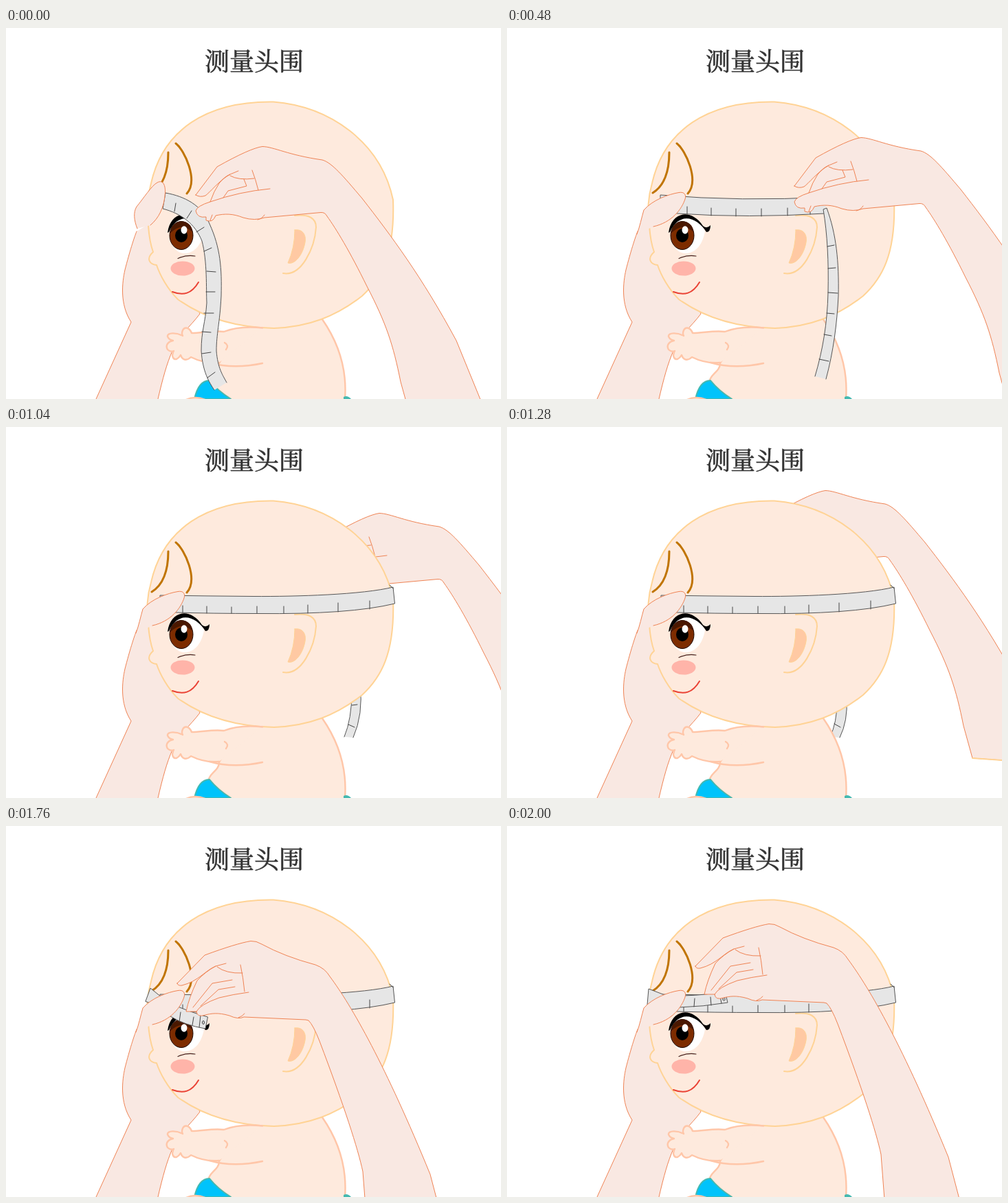
An HTML page for the animation above (4000 ms loop, 720 by 540 pixels).

```html
<!DOCTYPE html>
<html lang="zh">
<head>
<meta charset="utf-8">
<style>
html, body { margin: 0; width: 100%; height: 100%; overflow: hidden; background: #fff; }
svg { display: block; width: 720px; height: 540px; }
path { stroke-linejoin: round; stroke-linecap: round; }
.title { font: 36px "Noto Serif CJK SC", "Noto Sans CJK SC", "Noto Sans CJK", serif; fill: #333; stroke: #333; stroke-width: .6; }
.hand { fill: #f9e8e2; stroke: #ef8354; stroke-width: 1; }
.crease, .line { fill: none; }
.crease { stroke: #ef8354; stroke-width: 1; }
.head { fill: #feeadd; stroke: #ffd395; stroke-width: 2; }
.rim { fill: none; stroke: #ffd395; stroke-width: 2; }
.body { fill: #feeadd; stroke: #ffc6a8; stroke-width: 2.4; }
.tape { fill: #e6e6e6; stroke: #555; stroke-width: 1; }
.tick { fill: none; stroke: #444; stroke-width: 1; }
.hair { fill: none; stroke: #c07400; stroke-width: 3; }
</style>
</head>
<body>
<svg viewBox="0 0 720 540">
  <defs>
    <g id="flat">
      <path class="hand" d="M276 243L307 202Q355 175 373 172.500C390 173 410 185 460 192C474 196 490 215 518 248C560 302 605 362 655 455L702 570L587 562L574 515C563 460 553 430 525 376C500 325 480 292 467 274Q464 268 458 268.500L376 276Q362 281 345 276C330 270 318 270 305 273Q301 284 291 280L291 275Q278 277 276 266Q278 259 297 253Q302 238 310 226Q318 216 326 213C310 222 296 240 290 244Q282 247 276 243Z"/>
      <path class="crease" d="M297 253Q340 238 384 234M326 213L338 208M326 215Q338 222 361 219M358 207Q363 220 367 236M316 247L323 237L350 230L346 220M297 280L300 272M366 279Q372 278 376 272"/>
      <path class="rim" d="M587 562L702 570"/>
    </g>
    <g id="bent">
      <path class="hand" d="M249 229L289 188Q335 171 356 167.500Q364 167 372 172Q405 190 450 202Q464 207 471 219C503 262 552 348 617 507L633 568H524L519 503C512 470 492 408 456 313Q447 290 440 283L436 282L346 278Q338 282 325 276C308 271 298 273 290 275Q278 279 277 270L262 270Q266 250 278 225Q290 212 305 204C290 210 280 226 256 232Q250 233 249 229Z"/>
      <path class="crease" d="M277 270Q282 260 310 250Q330 245 353 242M305 204L320 200M307 205Q320 215 344 214M341 202Q345 220 347 241M272 264L300 229L329 224M283 262L309 238L333 234M338 279Q344 277 347 273"/>
      <path class="rim" d="M524 568H633"/>
    </g>
  </defs>

  <text class="title" x="361" y="62" text-anchor="middle">测量头围</text>
  <path class="hand" d="M190 296C186 306 180 325 173 352C169 370 165 402 182 428L131 540V545H220L221 540C228 510 234 488 242 470C250 448 268 435 282 416L250 340L225 275"/>
  <g id="back"></g>

  <path class="body" d="M460 424C485 460 496 500 493 540V545H327V540Q308 528 295 513C296 504 310 500 310 488L340 437"/>
  <path d="M274 540Q280 513 296 513Q308 528 327 540Z" fill="#00c3fb" stroke="#45b9b0" stroke-width="2"/>
  <path d="M491 541V537Q497 534 503 541Z" fill="#45b9b0"/>
  <path class="body" d="M258 543Q275 533 294 543"/>
  <path class="head" d="M207 288C203 262 207 240 211 226C228 150 290 106 389 107.500C470 114 545 165 563 250C566 330 545 365 518 390C480 420 440 435 390 437C330 436 285 420 250 395C235 380 224 360 219 345C209 344 203 336 214 326C210 315 208 302 207 288Z"/>
  <path class="body" d="M373 436.500C350 434 330 437 317 442C300 440 285 444 270 444C267 436 260 434 257 440Q255 445 257 448C248 443 234 443 235 449Q237 454 243 455C234 457 232 463 235 468Q239 472 244 470C240 477 243 483 248 482Q252 480 254 476C257 485 264 484 269 479C285 487 298 488 310 487"/>
  <path class="body" style="fill:none" d="M296 487Q330 497 373 488M318 458Q325 462 320 468"/>

  <path class="hair" d="M236 181Q236 225 212 240M247 168C260 178 280 222 263 241"/>
  <path d="M240 292C250 270 275 270 288 296C284 318 272 328 260 328C248 328 241 318 239 306Z" fill="#fff"/>
  <ellipse cx="255" cy="302" rx="17" ry="20.500" fill="#7d2c00" stroke="#1a0800"/>
  <path d="M238.500 299C240 276 270 276 271.500 297Q255 282 238.500 299Z" fill="#4a1800"/>
  <ellipse cx="255" cy="302" rx="9" ry="10"/>
  <ellipse cx="259" cy="294" rx="4.500" ry="5.800" fill="#fff"/>
  <path d="M235 298C239 267 268 262 285 288Q291 293 296 287Q296 297 290 297C277 276 251 266 237 297Z"/>
  <path class="line" d="M250 335.500Q262 330 275 332" stroke="#43201c" stroke-width="1.200"/>
  <ellipse cx="257" cy="350" rx="17.500" ry="10.500" fill="#ffb4a9"/>
  <path class="line" d="M242 384C258 390 270 387 280 370" stroke="#ea4335" stroke-width="2"/>
  <path class="rim" d="M420 273Q451 270 451 290C449 320 430 362 403 357"/>
  <path d="M420 294C432 292 437 302 435 312C432 330 420 345 410 342Q420 320 420 294Z" fill="#ffc9a3" stroke="#ffd395"/>

  <g id="tape"></g>
  <path id="thumb" class="hand"/>
  <g id="front"></g>
</svg>
<script>
const el = id => document.getElementById(id);
const mix = (a, b, k) => {
  const to = b.match(/-?[\d.]+/g);
  let i = 0;
  return a.replace(/-?[\d.]+/g, n => +n + (to[i++] - n) * k);
};
const tape = (d, ticks = '') => `<path class="tape" d="${d}"/><path class="tick" d="${ticks}"/>`;
const hand = (shape, x, y) => `<use href="#${shape}" x="${x}" y="${y}"/>`;

const thumbUp = 'M191 292C186 280 185 268 190 260C200 248 212 229 220 225C229 220 232 230 231.5 240C230 262 222 277 210 287';
const thumbFlat = 'M189 300C193 290 196 275 199 265C212 250 235 242 250 239.5C258 238 261 243 259 249C254 264 240 283 213 289';

const band = tape('M247 270Q300 271.5 365 271.5Q500 273 565.5 257L563 233C520 244 420 247 360 246.500Q290 246 224 245V265Z',
  'M257 270v-10M292 271v-10M328 271v-9M365 271v-10M404 271v-10M439 271v-12M483 269v-13M529 265v-12M558 230L563 235');

// Loose end of the tape, from the fold to its final place on the forehead
const endA = ['M239 277Q260 290 290 295L293.5 278Q275 273 250 263',
  'M254 271L252 285M273 278L271 290M283 276L281 293M285.5 286a1.5 2.5 0 1 0 3 0a1.5 2.5 0 1 0 -3 0'];
const endB = ['M250 264Q285 263 321 257L317 241Q290 246 258 247',
  'M273 251L272 263M296 249L297 261M309 243L312 258M314 252a1.5 2.5 0 1 0 3 0a1.5 2.5 0 1 0 -3 0'];
const foldA = 'M203 255L210 236L226 249L222 262Z', foldB = 'M204 260L206 237L232 247L225 262Z';

const wrap = k => ({
  tape: band + tape(mix(foldA, foldB, k)) + tape(mix(endA[0], endB[0], k), mix(endA[1], endB[1], k)),
  front: hand('bent', 25 * k, -25 * k)
});

const steps = [
  [0, {
    thumb: thumbUp,
    tape: tape('M303 527C295 515 286 500 284 470C284 440 290 430 292 400C291 380 293 340 285 310C275 285 255 270 228 263L232 240C260 245 285 258 296 285C312 320 314 350 313 390C311 430 306 445 306 470C308 495 315 505 321 516',
      'M247 255L245 267M270 266L263 277M288 290L277 297M299 320L288 325M305 355L292 354M304 384L291 384M302 415L288 415M298 443L285 442M298 472L285 474M304 501L293 509'),
    front: hand('flat', 0, 0)
  }],
  [240, {
    thumb: mix(thumbUp, thumbFlat, .5),
    tape: tape('M308 510C303 455 312 430 315 400C315 370 315 340 305 303C290 285 265 273 238 267L226 240C265 247 295 252 317 272C334 310 336 350 334 390C332 430 322 460 326 504',
      'M259 258L256 270M287 265L283 279M316 310L307 313M326 345L315 345M326 380L315 380M324 410L314 410M320 438L309 437M317 470L306 470'),
    front: hand('flat', 18, -2)
  }],
  [320, {
    tape: tape('M340 275Q290 280 249 270L222 256V241Q260 250 290 253.500T345 254', 'M270 261V273M305 264V277') +
      tape('M314 491C325 460 336 420 341 375C344 345 343 300 338 275L341 274C356 300 358 350 354 390C350 430 345 460 335 493',
        'M342 319L352 316M343 346L355 345M340 375L355 376M336 401L347 402M330 432L341 435M320 468L334 472'),
    front: hand('flat', 37, -5)
  }],
  [480, {
    tape: tape('M462 270Q350 277 247 270L223 260V243Q340 253 466 246', 'M262 260v11M297 262v11M333 263v11M370 263v11M408 262v11M441 260v11') +
      tape('M448 507C459 470 466 430 467 385C468 340 466 300 460 264L465 262C479 300 483 340 482 390C480 430 475 470 464 511',
        'M466 318L476 316M467 350L478 349M467 385L481 386M465 415L476 416M461 446L472 448M454 482L468 485'),
    front: hand('flat', 142, -13)
  }],
  [720, {
    tape: band + tape('M554 478C565 450 578 400 578 345C578 310 572 270 562 236L566 235C585 270 595 320 595.500 370C595 420 583 455 570 482',
      'M566 250L573 246M569 275L578 271M573 303L582 286M576 337L588 334M578 374L589 375M575 410L587 412M567 446L578 449M557 472L569 477'),
    front: hand('flat', 227, -38)
  }],
  [1040, {
    tape: band,
    back: hand('flat', 170, -47) + tape('M492 451Q503 425 503 385L515 375Q520 418 505 452', 'M503 405L511 404M498 433L507 437')
  }],
  [1280, {
    tape: band,
    back: hand('flat', 90, -80) + tape('M470 451Q480 430 480 400L494 395Q496 428 484 452', 'M476 432L485 437')
  }],
  [1520, {
    tape: band + tape('M222 262L206 257L150 233L147 215L211 236L226 248Z', 'M169 224L166 237M190 232L186 245'),
    front: hand('bent', -83, -47)
  }],
  [1760, wrap(0)],
  [1840, wrap(1 / 3)],
  [1920, wrap(2 / 3)],
  [2000, wrap(1)]
];

let shown;
function draw() {
  const t = performance.now() % 4000;
  const pose = steps.findLast(([start]) => start <= t)[1];
  if (pose !== shown) {
    shown = pose;
    for (const id of ['back', 'tape', 'front']) el(id).innerHTML = pose[id] || '';
    el('thumb').setAttribute('d', pose.thumb || thumbFlat);
  }
  requestAnimationFrame(draw);
}
draw();
</script>
</body>
</html>
```
